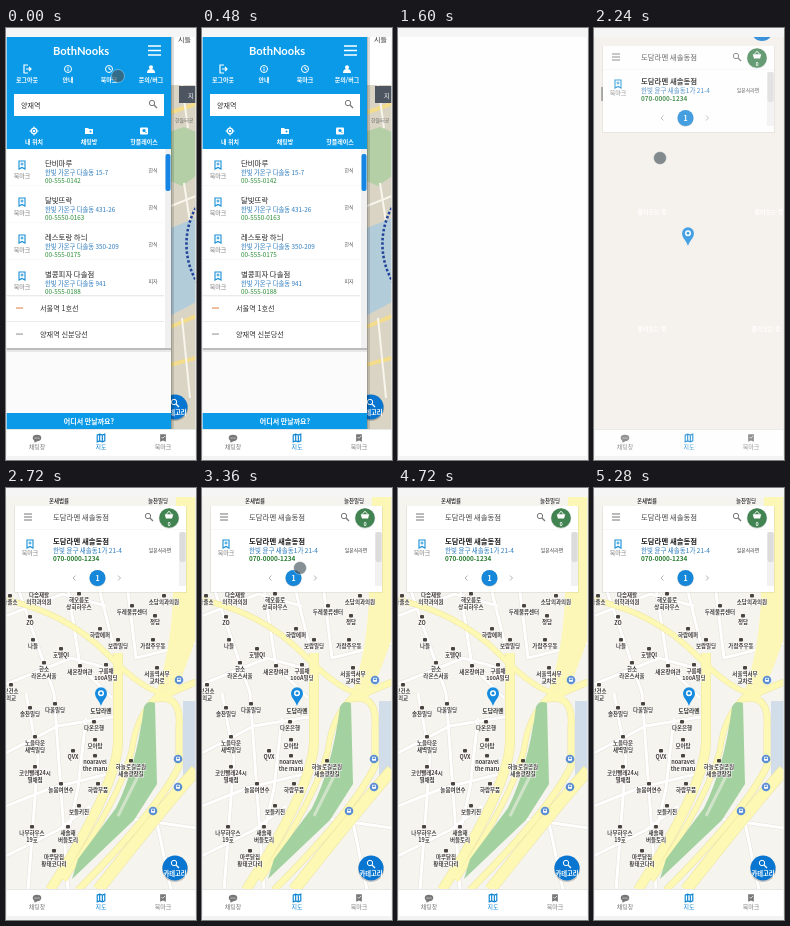
Animation, 190 px wide and 432 px high, one loop 5360 ms. Source, as an HTML page:

```html
<!DOCTYPE html>
<html>
<head>
<meta charset="utf-8">
<title>Map search</title>
<style>
html, body { margin: 0; width: 100%; height: 100%; overflow: hidden; background: #fff; }
svg { display: block; width: 100vw; height: 100vh; }
text { font-family: "Noto Sans CJK KR", "Noto Sans CJK", "Noto Sans", sans-serif; }
</style>
</head>
<body>
<svg id="stage" viewBox="0 0 190 432"></svg>
<script>
const LOOP = 5360, BLUE = '#0a9ae8', GREY = '#777';

const rect = (x, y, w, h, fill, more = '') =>
  `<rect x="${x}" y="${y}" width="${w}" height="${h}" fill="${fill}" ${more}/>`;
const circle = (x, y, r, fill, more = '') =>
  `<circle cx="${x}" cy="${y}" r="${r}" fill="${fill}" ${more}/>`;
const line = (d, color, width = 1, more = '') =>
  `<path d="${d}" fill="none" stroke="${color}" stroke-width="${width}" ${more}/>`;
const shape = (d, fill) => `<path d="${d}" fill="${fill}"/>`;
const text = (x, y, s, size, fill = '#333', anchor = 'start', more = '') =>
  `<text x="${x}" y="${y}" font-size="${size}" fill="${fill}" text-anchor="${anchor}" ${more}>${s}</text>`;
const mid = (x, y, s, size, fill, more) => text(x, y, s, size, fill, 'middle', more);
const at = (x, y, body, scale = 1) => `<g transform="translate(${x} ${y}) scale(${scale})">${body}</g>`;
const group = (id, body) => `<g id="${id}">${body}</g>`;
const BOLD = 'font-weight="700"', SEMI = 'font-weight="500"';

// Icons are centred on the origin, about 8 px wide.
const icon = {
  exit: c => line('M1-4H-3V4H1M-1 0H4M2-2L4 0L2 2', c, 1.2),
  info: c => circle(0, 0, 3.5, 'none', `stroke="${c}"`) + rect(-.5, -.5, 1, 2.6, c) + rect(-.5, -2, 1, 1, c),
  clock: c => circle(0, 0, 3.5, 'none', `stroke="${c}"`) + line('M0-2V0L2 1', c),
  person: c => circle(0, -1.8, 2, c) + shape('M-4 4Q-4 0 0 0T4 4Z', c),
  target: c => circle(0, 0, 2.8, 'none', `stroke="${c}" stroke-width="1.3"`) + circle(0, 0, 1.3, c) +
    line('M0-4.5V-2.5M0 2.5V4.5M-4.5 0H-2.5M2.5 0H4.5', c),
  folder: c => shape('M-4-3H-1L0-2H4V3H-4Z', c) + circle(1.5, .5, 1, BLUE),
  photo: c => rect(-4, -3.5, 8, 7, c, 'rx="1"') + circle(0, -.5, 1.6, BLUE) + line('M1 .5L2.5 2', BLUE),
  search: c => circle(-1, -1, 2.7, 'none', `stroke="${c}"`) + line('M1 1L4 4', c, 1.2),
  bars: c => line('M-4-3H4M-4 0H4M-4 3H4', c),
  mark: c => line('M-3-4H3V4L0 2.4L-3 4Z', c, 1.1) + line('M-1.5-1H1.5M0-2.5V.5', c, .9),
  markFull: c => shape('M-3-4H3V4L0 2.6L-3 4Z', c) + line('M-1.6-1L-.3 .3L2-2', '#fff', .8),
  chat: c => `<ellipse rx="4.5" ry="3.3" fill="${c}"/>` + shape('M-3 2L-2.5 5L1 3Z', c) +
    circle(-2, 0, .6, '#fff') + circle(0, 0, .6, '#fff') + circle(2, 0, .6, '#fff'),
  map: c => line('M-4-3L-1.4-4L1.4-3L4-4V3L1.4 4L-1.4 3L-4 4ZM-1.4-4V3M1.4-3V4', c, 1.2),
  basket: c => shape('M-5-1H5L3.6 4H-3.6Z', c) + line('M-3-1L0-4.5L3-1', c, 1.1)
};
const put = (name, x, y, color, scale) => at(x, y, icon[name](color), scale);

const category = (x, y) => circle(x, y + 1, 13, '#0003') + circle(x, y, 12.5, '#0876d0') +
  put('search', x, y - 4, '#fff', 1) + mid(x, y + 7.5, '카테고리', 6.3, '#fff', BOLD);

const bus = (x, y) => circle(x, y, 4.3, '#5b8ed2') + rect(x - 2, y - 2.3, 4, 4, '#fff', 'rx=".7"') +
  rect(x - 1.3, y - 1.5, 2.6, 1.5, '#5b8ed2');

const nav = rect(0, 401, 190, 27, '#fff') + rect(0, 401, 190, .7, '#ddd') +
  [['chat', 31, '채팅창', GREY], ['map', 95, '지도', '#0b83d3'], ['markFull', 157, '북마크', GREY]]
    .map(([i, x, s, c]) => put(i, x, 410, c, .95) + mid(x, 421, s, 6, c, SEMI)).join('');

const frame = rect(0, 0, 190, 9, '#f5f5f5') + rect(0, 428, 190, 4, '#f3f3f3') +
  rect(0, 9, .7, 419, '#e8e8e8') + rect(189.3, 9, .7, 419, '#e8e8e8');

function drawer() {
  const shops = [
    ['단비마루', '한빛 가온구 다솔동 15-7', '00-555-0142', '한식'],
    ['달빛뜨락', '한빛 가온구 다솔동 431-26', '00-5550-0163', '한식'],
    ['레스토랑 하늬', '한빛 가온구 다솔동 350-209', '00-555-0175', '한식'],
    ['별콩피자 다솔점', '한빛 가온구 다솔동 941', '00-555-0188', '피자']
  ];
  const top = [['exit', 21, '로그아웃'], ['info', 62, '안내'], ['clock', 103, '북마크'], ['person', 145, '문의/버그']];
  const tabs = [['target', 28, '내 위치'], ['folder', 83, '채팅방'], ['photo', 138, '핫플레이스']];
  const behind = rect(0, 0, 190, 432, '#fff') +
    text(172, 2, '페이지', 7) + text(172, 14, '지를', 7) +
    rect(160, 57, 30, 345, '#d9d4c4') +
    shape('M160 105L178 99L190 104V148L176 158L160 151Z', '#b4cfa6') +
    shape('M160 202L190 190V274L160 290Z', '#b2ccda') +
    line('M160 86L190 76M162 300L190 288M160 338L190 330', '#f3dc8c', 4) +
    line('M176 57L182 100M178 155L184 194M176 290L184 370M160 180L190 168', '#f8f5ec', 2) +
    rect(173, 58, 17, 17, '#4d5660') + text(182, 70, '지', 6, '#fff') +
    text(169, 94, '한들터공', 5, '#666') +
    line('M192 176A75 75 0 0 0 192 256', '#24459a', 2.6, 'stroke-dasharray="2.5 2"') +
    category(169, 379) +
    rect(165, 9, 1, 392, '#0004') + rect(166, 9, 2, 392, '#0002');
  const head = rect(0, 9, 165, 112, BLUE) +
    mid(75, 27, 'BothNooks', 11.2, '#fff', 'font-weight="700" style="font-family:Lato,sans-serif"') +
    line('M142 18H155M142 22.5H155M142 27H155', '#fff', 1.7) +
    top.map(([i, x, s]) => put(i, x, 41, '#fff') + mid(x, 53.5, s, 6, '#fff', BOLD)).join('') +
    rect(8, 66, 150, 22, '#fff') + text(15, 79.5, '양재역', 7) + put('search', 147, 76, GREY) +
    tabs.map(([i, x, s]) => put(i, x, 103, '#fff') + mid(x, 116, s, 6, '#fff', BOLD)).join('');
  const rows = shops.map(([name, addr, tel, kind], i) => {
    const y = 137.5 + i * 37;
    return put('mark', 16, y - .5, '#168fd5') + mid(16, y + 12, '북마크', 6, GREY) +
      text(39, y, name, 7.4, '#222', 'start', SEMI) + text(39, y + 9, addr, 6.3, '#2879bd') +
      text(39, y + 17, tel, 6.3, '#258a31', 'start', SEMI) + mid(147, y + 6, kind, 5, '#555') +
      rect(0, y + 20, 158, .4, '#f0f0f0');
  }).join('');
  const stations = [['서울역 1호선', 280, '#e08a50'], ['양재역 신분당선', 306, '#999']]
    .map(([s, y, c]) => rect(0, y - 13, 158, .6, '#ddd') + rect(10, y - .5, 7, 1.1, c) + text(34, y + 2.5, s, 7.2)).join('');
  return behind + rect(0, 9, 165, 392, '#fbfbfb') + rect(0, 320, 165, 2, '#bbb') + rect(0, 322, 165, 2, '#e8e8e8') +
    rect(0, 121, 165, 199, '#fff') + head + rows + stations +
    rect(159, 121, 6, 199, '#f0f0f0') + rect(159.5, 126, 5, 37, '#1686e4', 'rx="2"') +
    rect(0, 385, 165, 16, BLUE) + mid(83, 395.5, '어디서 만날까요?', 7, '#fff', BOLD) + nav + frame;
}

function cityMap() {
  const places = [
    [53, 15, '온새법률'], [152, 15, '늘찬빌딩'], [33, 109, '다솜재활|의학과의원'], [73, 114, '해오름로|상회하우스'],
    [158, 116, '소담의과의원'], [126, 126, '두레물류센터'], [4, 116, '파출소'],
    [24, 137, 'ZO'], [149, 136, '정담'], [94, 149, '하람에퍼'], [27, 160, '나들'], [112, 160, '보람빌딩'],
    [147, 160, '가람주우동'], [55, 169, '호텔QI'], [38, 183, '한소|라온스서울'], [74, 186, '새온장여관'],
    [100, 185, '구름채|100A빌딩'], [151, 188, '서울역서부|교차로'], [5, 205, '보건소|의교'],
    [49, 224, '다울빌딩'], [24, 228, '솔찬빌딩'], [88, 242, '다온은행'],
    [29, 257, '노을타운|새벽빌딩'], [89, 260, '모아탐'], [67, 271, 'QVX'], [89, 276, 'noaravel|the maru'],
    [125, 281, '하늘로길공원|새솔광장길'], [29, 287, '코인빨래24시|별채점'], [55, 304, '늘봄여연수'],
    [92, 304, '하람부품'], [73, 326, '보들키친'], [26, 347, '나무하우스|19호'], [62, 347, '새솔재|버들토리'],
    [48, 371, '마루닭집|황태코다리']
  ];
  const halo = 'stroke="#fff" stroke-width="1" paint-order="stroke" font-weight="700"';
  const labels = places.map(([x, y, s]) =>
    rect(x - 2, y - 10, 4, 3.6, '#4a4440', 'rx="1"') +
    s.split('|').map((part, i) => mid(x, y + i * 6.5, part, 5.5, '#3f3b38', halo)).join('')).join('');
  const streets = 'M0 128L56 106L100 118M0 196L65 170L108 182M12 100L48 205L62 402M62 100L74 178L106 210' +
    'M0 265L52 238L112 228M0 318L45 300L106 285M0 368L52 342L84 318M80 230L72 300L62 345M20 205L32 270L22 402' +
    'M94 104L108 160M122 104L130 170L190 155M120 330L190 340M150 330L165 402';
  const yellow = [
    ['M0 112Q60 125 100 165T158 205', 5],
    ['M112 165V255Q110 300 44 402', 9],
    ['M156 204Q130 225 126 262Q114 310 58 392', 5],
    ['M190 194L152 210', 6],
    ['M150 211Q176 206 173 240V278Q152 322 72 402', 6],
    ['M190 282Q150 328 92 402', 11]
  ];
  return rect(0, 9, 190, 393, '#f6f4ef') +
    line(streets, '#e6e2da', 4) + line(streets, '#fff', 3) +
    shape('M177 213H190V284L177 300Z', '#d2ddea') +
    yellow.map(([d, w]) => line(d, '#ece4a0', w + 1)).join('') +
    shape('M170 9H190V150Q180 180 166 210L150 205Q166 160 167 105Z', '#fcf7b6') +
    yellow.map(([d, w]) => line(d, '#fdf8b4', w)).join('') +
    shape('M138 219Q141 212 149 215L151 296L128 332L66 391L72 371L110 320Q130 280 138 219Z', '#a3d2a0') +
    line('M132 288L112 328', '#cfe3c8', 3) +
    labels + bus(173, 192) + bus(172, 271) + bus(147, 323) + bus(172, 299);
}

const pin = shape('M0 13C-2 6-7 4-7-2A7 7 0 0 1 7-2C7 4 2 6 0 13Z', '#168be0') +
  circle(0, -2, 3.5, '#fff') + circle(0, -2, 1.7, '#168be0');

const card = rect(8, 18, 173, 87, '#0001') + rect(9, 18, 171, 86, '#fff') +
  put('bars', 22, 29, GREY) + text(47, 31.5, '도담라멘 새솔동점', 7.4, '#444') + put('search', 143, 29, GREY) +
  rect(9, 41, 171, .5, '#eee') + rect(173, 44, 7, 54, '#f1f1f1') + rect(173.5, 44, 6, 30, '#dcdcdc', 'rx="2"') +
  put('mark', 24, 56, '#168fd5') + mid(24, 67, '북마크', 6, GREY) +
  text(47, 56, '도담라멘 새솔동점', 7.4, '#222', 'start', BOLD) +
  text(47, 65, '한빛 윤구 새솔동1가 21-4', 6.5, '#2879bd') +
  text(47, 73, '070-0000-1234', 6.4, '#267a2e', 'start', BOLD) + mid(154, 63.5, '일본식라면', 4.9, '#444') +
  line('M69.5 87.5L67 90L69.5 92.5M112 87.5L114.5 90L112 92.5', '#aaa', .9) +
  circle(91.5, 90.5, 8.2, '#0003') + circle(91.5, 90, 8, '#1687d9') + mid(91.5, 92.7, '1', 7, '#fff', BOLD) +
  circle(163, 30.5, 10.3, '#0002') + circle(163, 30, 9.8, '#418451') +
  put('basket', 163, 27, '#fff', .85) + mid(163, 37.5, '0', 5.5, '#fff', BOLD);

const loading = rect(0, 9, 190, 393, '#f4f0ea') +
  [[58, 186], [175, 186], [58, 303], [172, 303]].map(([x, y]) => mid(x, y, '불러오는 중', 6, '#fff', BOLD)).join('') +
  circle(168, 2, 11, '#0876d0') + rect(7, 59, 2, 14, '#999');

const stage = document.getElementById('stage');
stage.innerHTML = group('menu', drawer()) +
  group('blank', rect(0, 0, 190, 432, '#fefefe') + frame) +
  group('page', loading +
    group('city', cityMap() + category(169, 380) + mid(95, 225, '도담라멘', 5.8, '#333', BOLD)) +
    group('pin', pin) + card + nav + frame) +
  group('touch', circle(0, 0, 6.5, '#46545a', 'stroke="#fff" stroke-opacity=".5"'));

const el = id => document.getElementById(id);
const [menu, blank, page, city, marker, touch] = ['menu', 'blank', 'page', 'city', 'pin', 'touch'].map(el);
const ramp = (t, a, b) => Math.min(1, Math.max(0, (t - a) / (b - a)));
const show = (node, value) => node.setAttribute('opacity', value);

// x, y, fade-in start and end, fade-out start and end, peak opacity
const taps = [
  [112, 48, -2, -1, 80, 360, .65],
  [66, 130, 2080, 2160, 2320, 2560, .65],
  [98, 80, 3120, 3200, 3400, 3680, .65]
];

function draw(now) {
  const t = now % LOOP;
  show(menu, t < 800 ? 1 : 0);
  show(blank, t < 800 ? 0 : 1);
  show(page, t < 2160 ? 0 : .75 + .25 * ramp(t, 2160, 2560));
  show(city, ramp(t, 2400, 2640));
  marker.setAttribute('transform', `translate(${t < 2400 ? 94 : 95} 207) scale(.85)`);
  const tap = taps.find(p => t >= p[2] && t < p[5]);
  show(touch, tap ? tap[6] * ramp(t, tap[2], tap[3]) * (1 - ramp(t, tap[4], tap[5])) : 0);
  if (tap) touch.setAttribute('transform', `translate(${tap[0]} ${tap[1]})`);
}

const start = performance.now();
function tick() {
  draw(performance.now() - start);
  requestAnimationFrame(tick);
}
tick();
</script>
</body>
</html>
```
